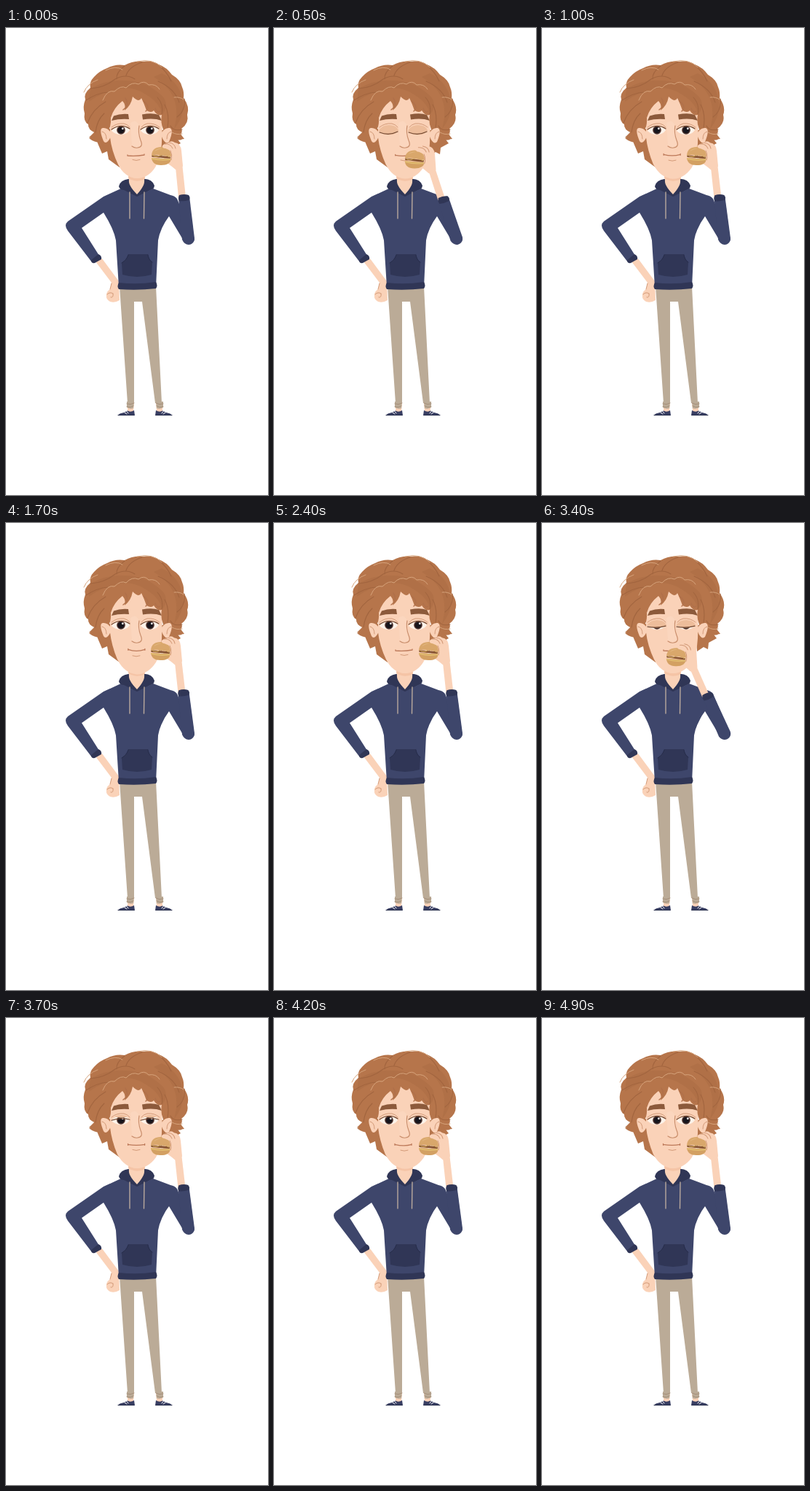
These frames come from a looping animation (360x640 px, 5000 ms). An HTML page:

```html
<!DOCTYPE html>
<html lang="en">
<head>
<meta charset="utf-8">
<title>Lunch</title>
<style>
html, body { margin: 0; width: 100%; height: 100%; overflow: hidden; background: #fff; }
svg { display: block; width: 100vw; height: 100vh; }
.skin { fill: #fad2b8; }
.shade { fill: #f2bd9c; }
.hair { fill: #b6754b; }
.navy { fill: #3e466b; }
.deep { fill: #303656; }
.pants { fill: #bbab97; }
.line { fill: none; stroke-linecap: round; stroke-linejoin: round; }
.crease { stroke: #d39a78; stroke-width: 1; }
.strand { stroke: #a2653f; stroke-width: 1.1; }
.glint { stroke: #d6a37b; stroke-width: 1; }
</style>
</head>
<body>
<svg viewBox="0 0 360 640">
  <defs>
    <clipPath id="eyeClip"><path d="M-14 1Q-10-7 0-7Q10-7 13 0Q9 7 0 7Q-9 7-14 1Z"/></clipPath>
    <g id="eye">
      <path fill="#fdf3ea" d="M-13 1Q-8-6 0-6Q8-6 12 0Q8 6 0 6Q-8 6-13 1Z"/>
      <circle r="5.8" fill="#4b302b"/>
      <circle r="4.3" fill="#17151c"/>
      <circle cx="2.3" cy="-2.2" r="1.4" fill="#fff"/>
    </g>
    <g id="shoe">
      <path class="skin" d="M13 513H22L21 526H13Z"/>
      <path class="pants" d="M12 512H22L21 521Q17 523 12 520Z"/>
      <path class="line" stroke="#a58f79" d="M12 515Q17 517 22 514M12 519Q17 521 21 518"/>
      <path fill="#383e62" d="M0 531Q1 528 8 527L13 524.500Q17 527 22 524L23 531Z"/>
      <path class="line" stroke="#fff" d="M9 527L12 529M12 525.500L14 528"/>
      <path class="line" stroke="#252a48" d="M0 530.600H22"/>
    </g>
  </defs>

  <!-- legs -->
  <path class="pants" d="M156 354H206L214 514H205L187 375H176L176 514H167Z"/>
  <use href="#shoe" x="154"/>
  <use href="#shoe" transform="translate(382) scale(-1 1) translate(154)"/>

  <!-- arm on hip -->
  <path class="skin" d="M123 320L132 316L155 347L156 373Q150 377 143 375Q137 372 138 366Q138 361 143 358L145 349Z"/>
  <path class="line crease" d="M139 365Q143 361 147 364M144 369Q148 370 147 364M145 350L143 358"/>

  <!-- head -->
  <path class="hair" d="M114 150L124 150L126 158L132 172L139 169L141 180L156 191L160 130L210 130L213 176L222 170L228 173L229 164L240 158L236 153L245 152L236 140L126 138Z"/>
  <path class="deep" d="M160 222Q158 207 171 207H189Q201 207 199 222L180 232Z"/>
  <path class="skin" d="M168 196H191L190 217L180 229L169 217Z"/>
  <path class="shade" opacity=".65" d="M168 202Q180 210 191 202V207Q180 213 168 206Z"/>
  <path id="jaw" class="skin"/>
  <path fill="#fbdac4" d="M171 130Q178 124 182 132L186 160Q180 166 173 163Z" opacity=".5"/>
  <path class="line" stroke="#c98e6c" stroke-width="1.2" d="M183 134Q181 143 185 154Q189 163 181 164Q177 165 173 162"/>
  <path fill="#8c5a3b" d="M145 127L148 120.500Q157 117 168 118L169 125Q156 124 145 127ZM187 118.500Q201 116 210 119L214 127Q203 123 188 125.500Z"/>
  <g id="eyes"></g>
  <path id="gape" fill="#8b3f39"/>
  <path id="mouth" class="line" stroke="#bd7959" stroke-width="1.3"/>
  <path id="lip" class="line crease"/>

  <!-- hair -->
  <path class="hair" d="M114 151Q120 149 123 144Q112 139 113 132Q106 128 108 117Q105 108 109 98Q106 90 116 82Q114 74 121 67Q128 59 139 55Q150 49 163 51Q174 45 187 46Q201 44 210 50Q221 54 228 64Q240 71 242 81Q245 88 244 96Q253 108 249 119Q252 130 241 138Q244 145 236 147L242 153Q229 156 223 147Q217 146 216 139Q212 129 214 119Q208 121 203 113Q200 117 193 113Q190 104 186 96Q183 103 174 94Q172 106 163 113Q165 105 160 100Q148 109 144 123Q145 136 138 146Q133 152 127 151Q128 155 131 157Q121 157 114 151Z"/>
  <path fill="#a4673f" opacity=".35" d="M116 83Q140 70 163 72Q191 72 211 90Q226 101 215 119Q211 102 192 91Q175 80 157 83Q131 88 114 101ZM214 62Q238 74 242 97Q247 119 231 138Q239 111 228 91Q221 78 203 67Z"/>
  <path class="line strand" d="M116 83Q135 82 150 70Q165 62 177 70M110 99Q125 89 140 88M112 130Q119 111 137 101M123 143Q125 126 135 117M163 52Q151 61 152 70M187 47Q169 53 165 65M210 51Q222 61 227 73M209 73Q232 83 238 102M218 105Q225 117 222 137M245 97Q247 113 235 122M214 118Q217 105 208 95M242 139Q230 142 226 134"/>
  <path class="line glint" d="M107 88Q112 76 126 71M133 99Q139 84 149 87Q158 78 165 82Q173 73 182 77Q190 71 196 78Q206 76 211 84M137 58Q151 51 160 57M180 46Q202 41 214 54M231 95Q239 94 244 98M228 143Q235 147 242 145"/>
  <path class="line" stroke="#b0704a" stroke-width="1.5" d="M164 96Q170 106 161 112M189 100Q199 108 192 114M205 110Q208 117 212 114"/>
  <path class="skin" d="M144 149Q138 161 134 155Q127 138 133 137Q139 136 144 143ZM214 149Q219 161 224 156Q231 139 225 137Q219 136 214 143Z"/>
  <path class="line crease" d="M132 142Q138 143 138 152M227 142Q221 143 221 152"/>

  <!-- hoodie -->
  <path class="navy" d="M158 220L134 231L85 265Q79 270 85 278L118 321L130 315L104 274L134 253Q148 275 151 291L155 355H206L209 291Q212 274 224 258L245 293Q254 301 259 290L235 234Q232 230 226 229L202 220L180 231Z"/>
  <path class="deep" d="M117 318L127 310Q132 312 131 317L122 322Q117 323 117 318ZM155 349Q180 352 206 348Q209 353 206 357Q181 360 155 358Q152 354 155 349Z"/>
  <path class="deep" d="M168 310H195Q196 317 201 321L200 338Q180 344 160 338L159 322Q166 317 168 310Z"/>
  <path class="line" stroke="#272d4b" d="M168 311Q166 318 159 322M195 311Q196 318 201 321"/>
  <path class="deep" d="M169 207Q157 208 155 217Q157 224 166 221L180 231L193 221Q203 224 204 216Q201 207 190 207Q192 215 180 228Q167 215 169 207Z"/>
  <path class="line" stroke="#b9a99d" stroke-width="1.4" d="M170 225L170 261M190 225L189.500 261"/>

  <!-- eating arm -->
  <g id="arm">
    <path class="skin" d="M237 232L233 191L242 185L247 232Z"/>
    <g id="hand">
      <path class="skin" d="M214 165Q215 158 222 158Q227 153 232 157Q240 158 241 168L243 189Q240 196 233 194Q226 188 221 185L215 175Z"/>
      <path fill="#d3a062" d="M200 178L227 179Q226 188 213 188Q201 188 200 178Z"/>
      <path class="line" stroke="#e0bb70" stroke-width="2" d="M201 179Q213 182 226 180"/>
      <path class="line" stroke="#84502f" stroke-width="2.6" d="M201.500 175.500L225 177.500"/>
      <path class="line" stroke="#c9a15a" stroke-width="1.2" d="M201 174Q206 178 211 175T225 177"/>
      <path fill="#d9a76b" d="M200 174Q201 163 214 163Q227 164 227 176Q213 173 200 174Z"/>
      <path fill="#e6be88" opacity=".6" d="M204 169Q208 164 215 165Q210 166 204 169Z"/>
      <path class="skin" d="M215 161Q221 156 227 161L236 166L235 182Q229 187 226 182Q229 176 226 168L219 165Q214 165 215 161Z"/>
      <path class="line crease" d="M218 159Q226 158 229 165M224 157Q232 158 233 165M227 181Q229 174 226 168"/>
    </g>
    <path class="navy" d="M237 232L252 231L259 288Q259 296 251 297Q245 297 242 290Z"/>
    <path class="deep" d="M238 229Q245 227 251 229Q254 233 251 236Q244 238 238 237Q236 233 238 229Z"/>
  </g>
</svg>
<script>
const $ = id => document.getElementById(id);
const set = (el, attr, value) => el.setAttribute(attr, value);

$("eyes").innerHTML = [[158, 140, 1], [198, 140, -1]].map(([x, y, side]) => `
  <g transform="translate(${x} ${y})">
    <use href="#eye"/>
    <g clip-path="url(#eyeClip)"><path class="lid" fill="#edbd9b" d="M-16-14H16V2Q0 11-16 2Z"/></g>
    <path class="line lash" stroke="#70462f" stroke-width="1.2"/>
    <path class="line crease" transform="scale(${side} 1)" d="M-13-4Q-6-10 4-9Q9-8 12-4"/>
  </g>`).join("");
const lids = document.querySelectorAll(".lid");
const lashes = document.querySelectorAll(".lash");

const ease = k => k * k * (3 - 2 * k);
// Eased value at time t through [time, value] keys
function track(t, keys) {
  const i = keys.findIndex(k => k[0] > t);
  if (i < 0) return keys[keys.length - 1][1];
  if (!i) return keys[0][1];
  const [a, u] = keys[i - 1], [b, v] = keys[i];
  return u + (v - u) * ease((t - a) / (b - a));
}

// One bite every 3 s: a quick reach, a blink, then a long chew
const PERIOD = 3000;
const reach = [[0, 0], [350, 18], [400, 18], [660, .6], [2800, .6], [3000, 0]];
const shut = [[50, 0], [300, .8], [400, .8], [480, 1], [560, 1], [780, 0]];
const bite = [[120, 0], [280, 1], [400, 0]];
const munch = [[400, 0], [650, 1], [2000, 1], [2350, 0]];

function draw(ms) {
  const t = ms % PERIOD;
  const a = track(t, reach);
  set($("arm"), "transform", `rotate(${-a} 251 288)`);
  set($("hand"), "transform", `rotate(${a * 1.12} 237 190)`);

  const lid = track(t, shut), edge = -6 + 11 * lid, corner = -1 + 4 * lid;
  for (const el of lids) set(el, "transform", `translate(0 ${-14 + 14 * lid})`);
  for (const el of lashes) set(el, "d", `M-13 ${corner}Q0 ${edge * 1.6} 12 ${corner - 1}`);

  const chew = track(t, munch), wave = Math.sin((t - 1600) / 400 * 2 * Math.PI);
  const drop = chew * (.7 + .7 * wave), open = track(t, bite), side = chew * Math.cos(t / 130);
  const chin = 206 + drop + open * 2;
  set($("jaw"), "d", `M143 115Q149 92 180 92Q213 96 215 122L214 158
    Q213 179 ${205 + chew} 191Q195 ${chin} 180 ${chin}Q163 ${chin - 1} ${154 - chew} 187Q145 168 143 150Z`);
  const y = 175 - chew * .7;
  set($("mouth"), "d", `M${167 + side} ${y - chew}Q179 ${y + 1 + drop * 1.5} ${190 + side} ${y - 1}
    M${167 + side} ${y - 1 - chew}v${1 + chew}M${190 + side} ${y - 2}v${1 + chew}`);
  set($("gape"), "d", `M170 ${y}Q180 ${y - open * 5} 189 ${y}Q180 ${y + open * 12} 170 ${y}Z`);
  set($("lip"), "d", `M174 ${180.5 + drop + open * 3}q5 2 10 0`);
}

function tick(now) {
  draw(Math.floor(now % 5000 / 100) * 100);
  requestAnimationFrame(tick);
}
draw(0);
requestAnimationFrame(tick);
</script>
</body>
</html>
```
